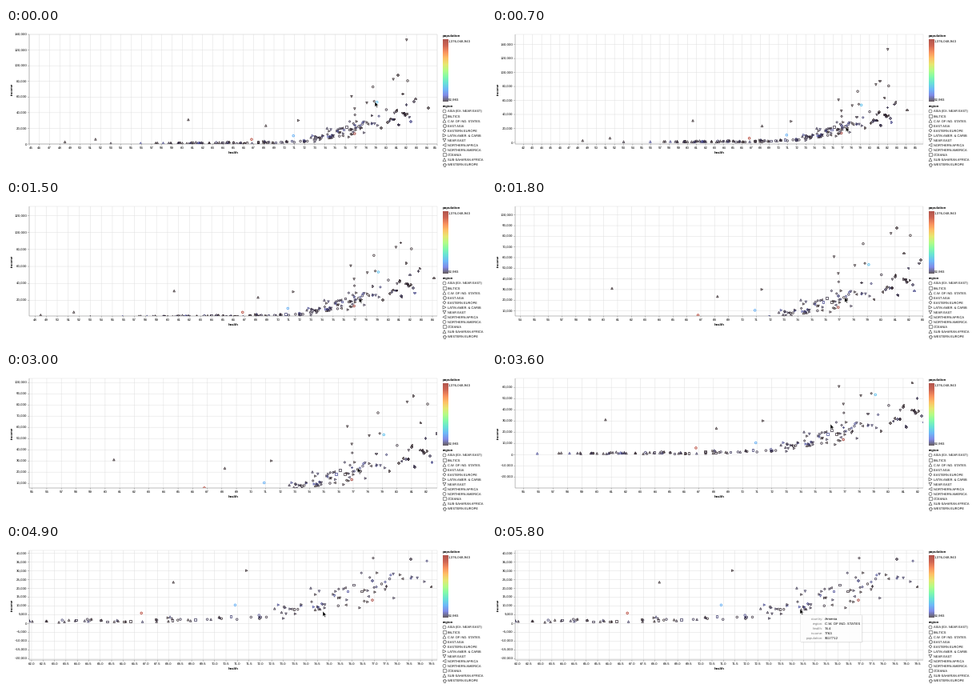
Write a matplotlib script that moves like this. It is 600x180 px and loops after 5.9 s.

```python
import math

import matplotlib.pyplot as plt
import numpy as np
from matplotlib.animation import FuncAnimation
from matplotlib.collections import LineCollection
from matplotlib.colors import LinearSegmentedColormap
from matplotlib.patches import FancyBboxPatch, Polygon, Rectangle

W, H, DPI = 600, 180, 100
PT = 72 / DPI
STEP_MS, FRAMES = 100, 59
LEFT, RIGHT, TOP, BOTTOM = 29, 539, 8, 145
LINE = 0.45 * PT

plt.rcParams.update({"font.family": "Liberation Sans", "text.hinting": "none"})
TURBO = LinearSegmentedColormap.from_list("turbo_soft", [
    "#23171b", "#4a58dd", "#2f9df5", "#27d7c4", "#4df884", "#95fb51",
    "#dedd32", "#ffa423", "#f65f18", "#ba2208", "#900c00"])

DIAMOND = (4, 0, 0)
# Name, marker, number of countries, mean and spread of health.
REGIONS = [("ASIA (EX. NEAR EAST)", "o", 20, 71, 4), ("BALTICS", "s", 3, 76, 0.5),
           ("C.W. OF IND. STATES", "^", 10, 70.5, 2), ("EAST ASIA", "P", 4, 77, 3),
           ("EASTERN EUROPE", DIAMOND, 14, 76.8, 1.5),
           ("LATIN AMER. & CARIB", ">", 31, 74.8, 2.3), ("NEAR EAST", "v", 10, 75, 3),
           ("NORTHERN AFRICA", "<", 5, 75, 1.8), ("NORTHERN AMERICA", "o", 1, 81.7, 0.1),
           ("OCEANIA", "s", 11, 67.5, 3.5), ("SUB-SAHARAN AFRICA", "^", 44, 62, 3.4),
           ("WESTERN EUROPE", "P", 20, 81.2, 0.8)]

# Countries off the general trend: health, income in thousands.
OUTLIERS = {"v": [(82, 132.9), (80.7, 82.6), (76.6, 60.7), (78.1, 52.5)],
            "o": [(78.7, 73), (82.1, 80.8)],
            "P": [(81.1, 88.3), (81.6, 64.3), (84.1, 46.6)],
            "^": [(48.5, 2.6), (51.5, 6.1), (60.6, 31.1), (68.2, 23.5), (74.4, 7.76)],
            ">": [(71.4, 30.1)]}
# Most populous countries: health, income, share of the largest population.
GIANTS = [(76.9, 13.3, 1), (66.8, 5.9, 0.95), (79.1, 53.4, 0.23), (70.9, 10.5, 0.19)]

# Time in seconds and zoom factor of the health and income domains.
WHEEL = [(0.4, 1), (1.0, 1.24), (1.8, 0.735), (2.2, 0.699)]
WHEEL_AT = (444, 126)
DRAG = (3.0, 3.6, 7, -50)
CLOSE_UP = (3.9, 4.5, 0.638)
CLOSE_UP_AT = (406, 110)
# Time in seconds and pointer tip.
POINTER = np.array([(0.1, 461, 92), (0.2, 443, 124), (3.2, 439, 119), (3.6, 423, 65),
                    (3.9, 404, 107), (4.6, 404, 107), (4.9, 396, 84), (5.5, 396, 84),
                    (5.8, 385, 81)])
ARROW = np.array([(0, 0), (0, 6.6), (1.5, 5.3), (2.5, 7.6), (3.6, 7.1),
                  (2.6, 4.9), (4.6, 4.8)])
TOOLTIP = [("country:", "Armenia"), ("region:", "C.W. OF IND. STATES"),
           ("health:", "74.4"), ("income:", "7763"), ("population:", "3017712")]

fig = plt.figure(figsize=(W / DPI, H / DPI), dpi=DPI, facecolor="white")
ax = fig.add_axes([0, 0, 1, 1])


def write(x, y, text, size=4.4, ha="left", color="black", weight="normal", z=3):
    return ax.text(x, y + 0.36 * size, text, fontsize=size * PT, ha=ha,
                   va="baseline", color=color, weight=weight, zorder=z)


def line_layer(color, z, segments=()):
    layer = LineCollection(segments, colors=color, linewidths=LINE, zorder=z)
    layer.set_snap(False)
    return ax.add_collection(layer)


def draw_marks(points, marker, size, width, **style):
    x, y = np.transpose(points)[:2]
    return ax.scatter(x, y, marker=marker, s=(size * PT) ** 2, facecolors="none",
                      linewidths=width * PT, zorder=2, **style)


def trend(health):
    return 1.3 + 44 / (1 + np.exp((77.8 - health) / 2.5))


def build_countries():
    """Return rows of (health, income, population share) for each marker."""
    rng = np.random.default_rng(4)
    countries = {}
    for _, marker, count, mean, spread in REGIONS:
        health = np.clip(rng.normal(mean, spread, count), 53, 83)
        income = trend(health) * np.exp(rng.normal(0, 0.3, count))
        share = np.minimum(rng.exponential(0.015, count), 0.12)
        countries.setdefault(marker, []).extend(zip(health, income, share))
    for marker, pairs in OUTLIERS.items():
        countries[marker] += [(health, income, 0) for health, income in pairs]
    countries["o"] += GIANTS
    return {marker: np.array(rows, float) for marker, rows in countries.items()}


def draw_legends():
    write(545.5, 10, "population", weight="bold")
    ax.imshow(np.linspace(1, 0, 200)[:, None], cmap=TURBO, alpha=0.7, aspect="auto",
              extent=(545.5, 552, 92, 14), zorder=2)
    write(552.7, 16.5, "1,376,048,943")
    write(552.7, 90, "52,993")
    write(545.5, 98, "region", weight="bold")
    for row, (name, marker, *_) in enumerate(REGIONS):
        y = 104 + 6.05 * row
        draw_marks([(548, y)], marker, 4, 0.6, edgecolors="black", alpha=0.7)
        write(552, y, name, 4.05)


def zoom_about(view, anchor, factor):
    """Scale a view (health, income, and their units per pixel) around a pixel."""
    health, income, per_x, per_y = view
    dx, dy = anchor[0] - LEFT, BOTTOM - anchor[1]
    return (health + dx * per_x * (1 - factor), income + dy * per_y * (1 - factor),
            per_x * factor, per_y * factor)


def view_at(t):
    view = (45, 0, 40 / (RIGHT - LEFT), 140 / (BOTTOM - TOP))
    view = zoom_about(view, WHEEL_AT, np.interp(t, *zip(*WHEEL)))
    start, end, dx, dy = DRAG
    moved = np.interp(t, (start, end), (0, 1))
    health, income, per_x, per_y = view
    view = (health - dx * moved * per_x, income + dy * moved * per_y, per_x, per_y)
    start, end, factor = CLOSE_UP
    return zoom_about(view, CLOSE_UP_AT, np.interp(t, (start, end), (1, factor)))


def nice_ticks(lo, hi, count):
    raw = (hi - lo) / count
    base = 10.0 ** math.floor(math.log10(raw))
    error = raw / base
    step = base * (10 if error >= 50 ** 0.5 else 5 if error >= 10 ** 0.5
                   else 2 if error >= 2 ** 0.5 else 1)
    first, last = math.ceil(lo / step - 1e-6), math.floor(hi / step + 1e-6)
    return [k * step for k in range(first, last + 1)], step


draw_legends()
plot_box = ax.add_patch(Rectangle((LEFT, TOP), RIGHT - LEFT, BOTTOM - TOP, fill=False,
                                  edgecolor="#dddddd", linewidth=LINE, snap=False))
line_layer("#888888", 1.5, [[(LEFT, TOP), (LEFT, BOTTOM), (RIGHT, BOTTOM)]])
grid = line_layer("#dddddd", 0.5)
ticks = line_layer("#888888", 1.5)
write((LEFT + RIGHT) / 2, 155.7, "health", ha="center", weight="bold")
ax.text(8, (TOP + BOTTOM) / 2, "income", fontsize=4.4 * PT, rotation=90,
        ha="center", va="center", weight="bold")

COUNTRIES = build_countries()
marks = {}
for marker, rows in COUNTRIES.items():
    marks[marker] = draw_marks(rows, marker, 2.5, 0.85,
                               edgecolors=TURBO(rows[:, 2]), alpha=0.8)
    marks[marker].set_clip_path(plot_box)
arrow = ax.add_patch(Polygon(ARROW, facecolor="black", edgecolor="white",
                             linewidth=LINE, zorder=6))
ax.set(xlim=(0, W), ylim=(H, 0))
ax.axis("off")
moving = []


def draw_tooltip(x, y):
    for offset, face, edge, alpha in ((0.8, "black", "none", 0.1),
                                      (0, "white", "#d8d8d8", 0.95)):
        moving.append(ax.add_patch(FancyBboxPatch(
            (x + 0.5 + offset, y + 7.5 + offset), 77, 34,
            boxstyle="round,pad=0,rounding_size=1", facecolor=face,
            edgecolor=edge, alpha=alpha, linewidth=LINE, zorder=4)))
    for row, (key, value) in enumerate(TOOLTIP):
        line = y + 12.4 + 5.95 * row
        moving.append(write(x + 29.3, line, key, ha="right", color="#808080", z=5))
        moving.append(write(x + 31, line, value, z=5))


def update(frame):
    t = frame * STEP_MS / 1000
    while moving:
        moving.pop().remove()
    health, income, per_x, per_y = view_at(t)

    def to_x(value):
        return LEFT + (value - health) / per_x

    def to_y(value):
        return BOTTOM - (value - income) / per_y

    lines, stubs = [], []
    values, step = nice_ticks(health, health + (RIGHT - LEFT) * per_x, 32)
    for value in values:
        x = to_x(value)
        lines.append([(x, TOP), (x, BOTTOM)])
        stubs.append([(x, BOTTOM), (x, BOTTOM + 2)])
        align = "left" if x - LEFT < 0.4 else "right" if RIGHT - x < 0.4 else "center"
        label = f"{value:.1f}" if step < 1 else f"{value:.0f}"
        moving.append(write(x, 149.2, label, ha=align))
    for value in nice_ticks(income, income + (BOTTOM - TOP) * per_y, 9)[0]:
        y = to_y(value)
        lines.append([(LEFT, y), (RIGHT, y)])
        stubs.append([(LEFT - 2, y), (LEFT, y)])
        label = f"{value * 1000:,.0f}".replace("-", "\u2212")
        moving.append(write(LEFT - 2.6, y, label, ha="right"))
    grid.set_segments(lines)
    ticks.set_segments(stubs)

    for marker, rows in COUNTRIES.items():
        marks[marker].set_offsets(np.column_stack([to_x(rows[:, 0]), to_y(rows[:, 1])]))

    tip = np.array([np.interp(t, POINTER[:, 0], axis) for axis in POINTER.T[1:]])
    arrow.set_xy(ARROW + tip)
    if t > 5.55:
        draw_tooltip(*tip)
    return []


anim = FuncAnimation(fig, update, frames=FRAMES, interval=STEP_MS,
                     init_func=lambda: [], repeat=True, repeat_delay=0, blit=False)
plt.show()
```
